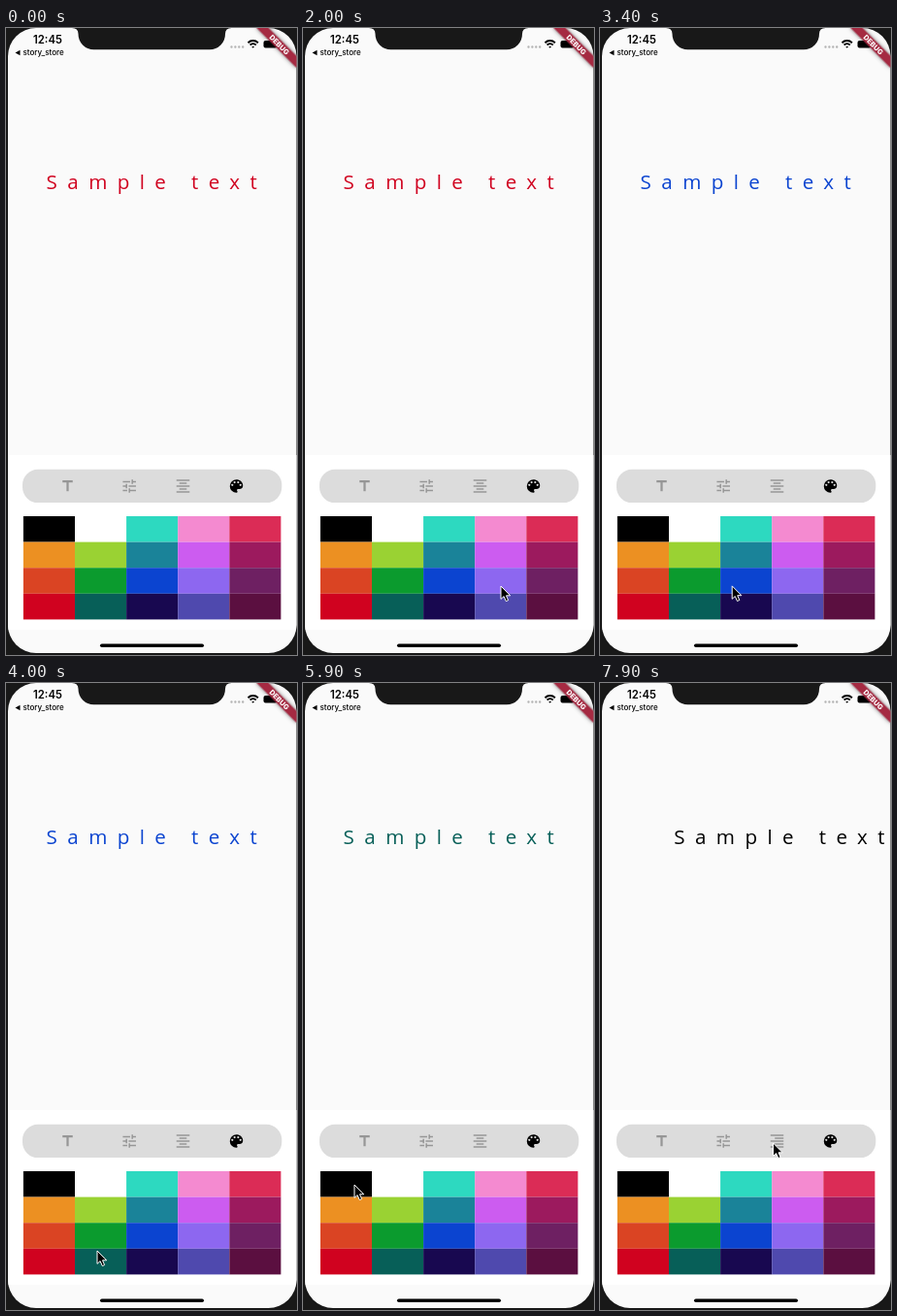
An HTML page for the animation above (8 s loop, 300 px wide and 646 px high).

```html
<!DOCTYPE html>
<html lang="en">
<head>
<meta charset="utf-8">
<title>Text colour picker</title>
<style>
html, body { margin: 0; width: 100%; height: 100%; overflow: hidden; background: #181818; }
svg { display: block; width: 300px; height: 646px; }
.ui { font-family: Inter, "Liberation Sans", sans-serif; }
#sample { font: 20.6px "Open Sans", "Noto Sans", sans-serif; letter-spacing: 10.4px; white-space: pre; }
#ribbon { filter: drop-shadow(0 0 2px rgba(0, 0, 0, .5)); }
</style>
</head>
<body>
<svg viewBox="0 0 300 646">
  <defs>
    <clipPath id="screen"><rect x="2" width="297.5" height="644" rx="29"/></clipPath>
  </defs>
  <rect width="300" height="646" fill="#181818"/>
  <g clip-path="url(#screen)">
    <rect width="300" height="646" fill="#fafafa"/>
    <rect y="440" width="300" height="180" fill="#fff"/>

    <g class="ui">
      <text x="28" y="16.3" font-size="11.3" font-weight="600">12:45</text>
      <path d="M9.5 25.5l5-2.7v5.4z"/>
      <text x="17.5" y="28.3" font-size="8" font-weight="500">story_store</text>
    </g>
    <path d="M232.5 19.5h12" stroke="#b4b4b4" stroke-width="2.4" stroke-linecap="round" stroke-dasharray="0 3.9"/>
    <g fill="none" stroke="#000" stroke-width="1.9">
      <path d="M249.5 15.2a7.4 7.4 0 0 1 10.4 0M251.6 17.5a4.5 4.5 0 0 1 6.2 0"/>
      <path d="M253.2 19l1.5 1.8 1.5-1.8z" fill="#000" stroke="none"/>
    </g>
    <rect x="265.5" y="13" width="14" height="7.5" rx="2"/>
    <g transform="translate(281.8 17.2) rotate(45)">
      <rect id="ribbon" x="-29" y="-4.4" width="58" height="8.8" fill="#a52a42"/>
      <text class="ui" y="2.6" font-size="7.3" font-weight="800" text-anchor="middle" fill="#fff">DEBUG</text>
    </g>
    <path d="M68 0q6.500 0 6.500 6a16 16 0 0 0 16 16.300H210a16 16 0 0 0 16-16.300q0-6 6.500-6z" fill="#181818"/>

    <text id="sample" y="166.200">Sample text</text>

    <rect x="17" y="454.700" width="267.300" height="34.400" rx="16" fill="#dcdcdc"/>
    <g id="icons"></g>
    <g id="swatches"></g>
    <rect x="97" y="634.500" width="107" height="3.600" rx="1.800"/>
  </g>
  <g id="pointer">
    <g id="ring" fill="none" transform="translate(.5 1)">
      <circle r="18.200" stroke="#111" stroke-width="2.600" opacity=".75"/>
      <circle r="18.200" stroke="#bbb" stroke-width=".9"/>
    </g>
    <path d="M0 0V13.400L3.100 10.600 5.300 15.600 7.600 14.600 5.500 9.800H9.700z" stroke="#fff" stroke-width="1" stroke-linejoin="round"/>
  </g>
</svg>
<script>
const LOOP = 8000, STEP = 100;
const FADE = 150;
const el = id => document.getElementById(id);

function add(parent, tag, attrs) {
  const node = document.createElementNS('http://www.w3.org/2000/svg', tag);
  for (const key in attrs) node.setAttribute(key, attrs[key]);
  return parent.appendChild(node);
}

// Swatches, row by row
const palette = ('#000000 #ffffff #2dd9c0 #f48ad0 #db2c56 ' +
  '#ec9022 #9ad233 #1a8399 #cc5cf0 #9c1a5e ' +
  '#da4423 #0b9b2e #0b44d0 #8d67f0 #6e2062 ' +
  '#d0021f #075f58 #180850 #4f49ae #5b0f40').split(' ');
const [black, blue, red, teal] = [0, 12, 15, 16].map(i => palette[i]);
const COLS = 5, W = 53.1, H = 26.6;

palette.forEach((fill, i) => add(el('swatches'), 'rect', {
  x: 17.9 + i % COLS * W, y: 503 + Math.floor(i / COLS) * H, width: W, height: H, fill
}));

// Icons: strokes on a 24-unit grid, drawn at 18px
function icon(cx, d, width = 2) {
  const g = add(el('icons'), 'g', { transform: `translate(${cx - 9} 463) scale(.75)` });
  add(g, 'path', { d, fill: 'none', stroke: '#969696', 'stroke-width': width });
  return g;
}

// Five lines, every second one short
function alignIcon(shortX, shortWidth) {
  let d = '';
  for (let i = 0; i < 5; i++) {
    d += i % 2 ? `M${shortX} ${4 + 4 * i}h${shortWidth}` : `M3 ${4 + 4 * i}h18`;
  }
  return icon(182.5, d);
}

icon(63.5, 'M5 5.500h14M12 5.500V19', 3);
icon(127.2, 'M3 6h10M16 3v6M16 6h5M3 12h5M8 9v6M11 12h10M3 18h6M12 15v6M12 18h9');
const centred = alignIcon(7, 10), right = alignIcon(9, 12);

const paint = icon(237.5, '');
add(paint, 'path', { d: 'M12 3a9 9 0 0 0 0 18c.8 0 1.500-.7 1.500-1.500 0-.4-.2-.7-.4-1-.9-1-.2-2.500 1.100-2.500H16a5 5 0 0 0 5-5c0-4.400-4-8-9-8z' });
for (let i = 0; i < 4; i++) {
  const a = (-165 + 50 * i) * Math.PI / 180;
  add(paint, 'circle', { cx: 12 + 5.85 * Math.cos(a), cy: 12 + 5.85 * Math.sin(a), r: 1.5, fill: '#dcdcdc' });
}

// Each move glides from the previous spot to x, y
const ENTER = 1000;
const moves = [
  { from: ENTER, to: 2000, x: 204, y: 575 },
  { from: 2000, to: 2600, x: 144, y: 573 },
  { from: 3200, to: 4000, x: 94, y: 585 },
  { from: 4000, to: 4700, x: 114.5, y: 603 },
  { from: 4800, to: 5900, x: 53, y: 517 },
  { from: 6900, to: 7700, x: 178.5, y: 474 }
];
const taps = [{ at: 2770, ink: blue }, { at: 4270, ink: teal }, { at: 6170, ink: black }];
const ALIGN = 7900;
const RINGS = [...taps.map(tap => tap.at), ALIGN - 2 * STEP];

const clamp = k => Math.min(1, Math.max(0, k));
const ease = k => k * k * (3 - 2 * k);
const mix = (a, b, k) => a + (b - a) * k;
const show = (node, on) => node.setAttribute('visibility', on ? 'inherit' : 'hidden');

function tip(t) {
  let x = 266, y = 512;
  for (const m of moves) {
    const k = ease(clamp((t - m.from) / (m.to - m.from)));
    x = mix(x, m.x, k);
    y = mix(y, m.y, k);
  }
  return [x, y];
}

const rgb = hex => [1, 3, 5].map(i => parseInt(hex.slice(i, i + 2), 16));

function ink(t) {
  let color = rgb(red);
  for (const tap of taps) {
    const k = clamp((t - tap.at) / FADE), next = rgb(tap.ink);
    color = color.map((v, i) => mix(v, next[i], k));
  }
  return `rgb(${color.map(Math.round)})`;
}

function draw(t) {
  const aligned = t >= ALIGN;
  el('sample').setAttribute('x', aligned ? 76.3 : 41.6);
  el('sample').setAttribute('fill', ink(t));
  show(centred, !aligned);
  show(right, aligned);
  show(el('pointer'), t >= ENTER);
  show(el('ring'), RINGS.some(at => t >= at && t < at + FADE));
  el('pointer').setAttribute('transform', `translate(${tip(t)})`);
}

const start = performance.now();
function tick() {
  const t = (performance.now() - start) % LOOP;
  draw(Math.floor(t / STEP) * STEP);
  requestAnimationFrame(tick);
}
tick();
</script>
</body>
</html>
```
